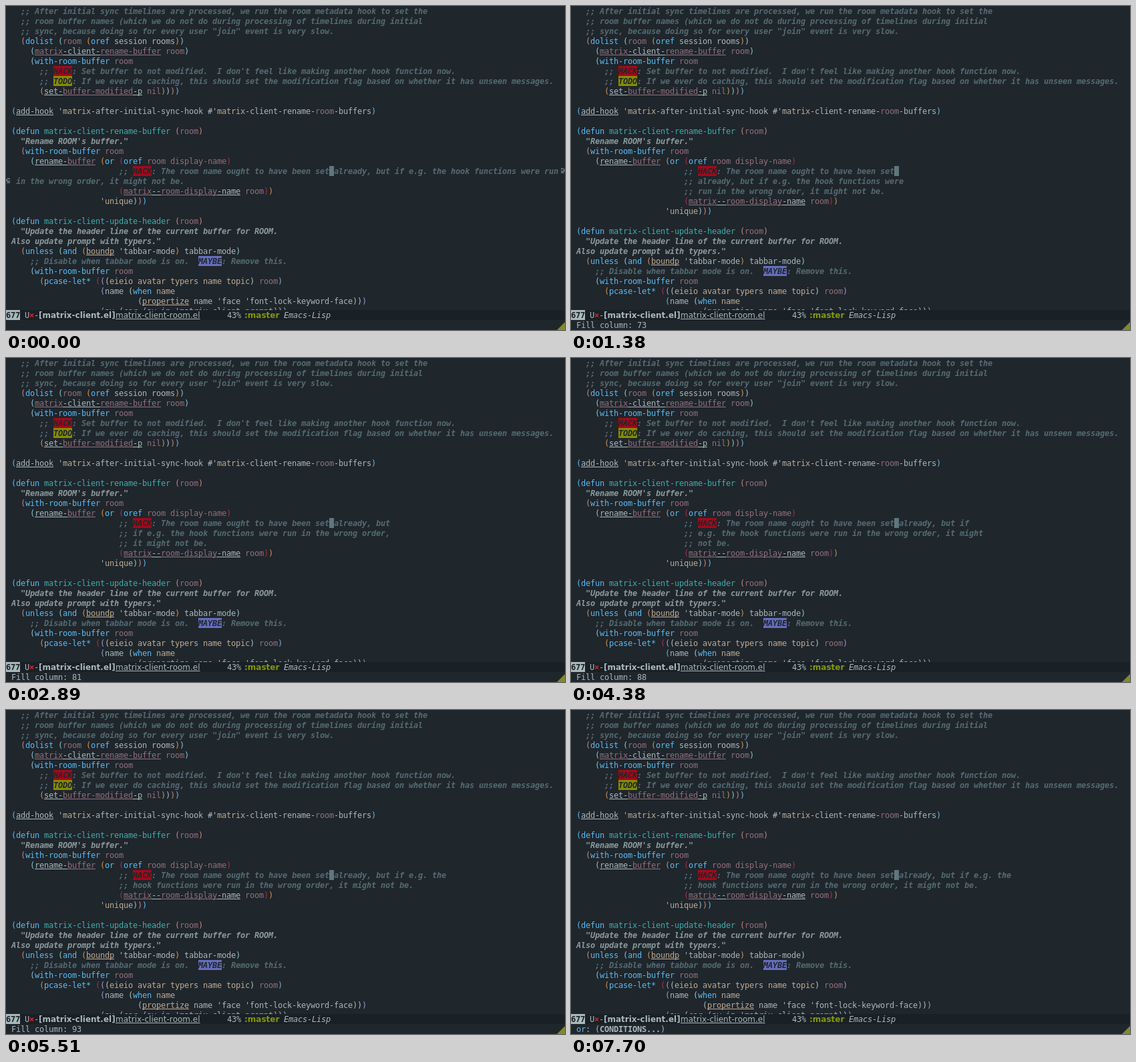
Write an HTML page that moves like this. It is 837 px wide and 486 px high and loops after 8000 ms.

```html
<!DOCTYPE html>
<html lang="en">
<head>
<meta charset="utf-8">
<title>Fill column</title>
<style>
html, body { margin: 0; width: 100%; height: 100%; overflow: hidden; background: #1f262c; }
#stage {
  position: relative; width: 837px; height: 486px; overflow: hidden;
  background: #1f262c; color: #a9b8bc;
  font: 12px/16px "DejaVu Sans Mono", monospace; white-space: pre;
  text-decoration-skip-ink: none; text-underline-offset: 1px; text-decoration-thickness: 1px;
  font-variant-ligatures: none; font-kerning: none;
}
#buffer { position: absolute; inset: 0 0 30px; overflow: hidden; }
.row { position: absolute; left: 8px; height: 15px; }
.row span { padding-top: 1px; }
.c, .d { font-weight: bold; font-style: italic; }
.c { color: #546a72; }
.d { color: #8b9a9e; }
.k { color: #5cbcf5; }
.f { color: #3fadac; }
.m { color: #93707c; }
.t { color: #c0ab92; }
.u, .v, .w { text-decoration-line: underline; }
.v { color: #93707c; }
.w { color: #c0ab92; }
.H, .T, .M { color: #1f262c; }
.H { background: #a3091a; }
.T { background: #858c05; }
.M { background: #666dbd; }
.C { background: #60767d; }
.b { font-weight: bold; }
.p1 { color: #5cbcf5; }
.p2 { color: #cc8878; }
.p3 { color: #8bc4d4; }
.p4 { color: #d6914e; }
.p5 { color: #ab3046; }
.p6 { color: #959fd2; }
.p7 { color: #b5c0c3; }
#mode { position: absolute; left: 0; top: 456px; width: 837px; height: 15px; background: #192026; }
#mode span { position: absolute; top: 0; height: 15px; }
#mode .sans { font-family: "DejaVu Sans", sans-serif; letter-spacing: 0; }
svg { position: absolute; left: 0; top: 0; }
</style>
</head>
<body>
<div id="stage">
  <div id="buffer"></div>
  <div id="mode"><span class="b" style="left:0;background:#a9b8bc;color:#192026">677</span><span style="left:28px">U</span><span class="b" style="left:35px;color:#d9252b">×</span><span style="left:42px">-</span><span class="sans b" style="left:49px">[matrix-client.el]</span><span class="sans u" style="left:164px">matrix-client-room.el</span><span style="left:331px">43%</span><span class="sans b" style="left:357px;color:#859900">:master</span><span style="left:416px;font-style:italic">Emacs-Lisp</span></div>
  <div class="row" id="echo" style="top:471px"></div>
  <svg width="837" height="486">
    <path d="M837 474V486H825Z" fill="#7e8a2b"/>
    <g id="wraps" fill="#566b74">
      <path id="hook" d="M2 0H6V2H2V3H3V4H5V3H6V8H1V7H2V6H1V5H0V2H1V1H2Z" transform="translate(0 258)"/>
      <path d="M2 0H6V2H2V3H3V4H5V3H6V8H1V7H2V6H1V5H0V2H1V1H2Z" transform="matrix(-1 0 0 1 837 243)"/>
    </g>
  </svg>
</div>
<script>
const LOOP = 8000, CELL = 7, ROW = 15, INDENT = 23;
const $ = id => document.getElementById(id);

// {x|text} wraps text in class x
const above = `  ;; After initial sync timelines are processed, we run the room metadata hook to set the
  ;; room buffer names (which we do not do during processing of timelines during initial
  ;; sync, because doing so for every user "join" event is very slow.
  ({k|dolist} ({m|room} ({k|oref} session rooms))
    ({v|matrix}{u|-client-}{v|rename-buffer} {m|room})
    ({k|with-room-buffer} {m|room}
      ;; {H|HACK}: Set buffer to not modified.  I don't feel like making another hook function now.
      ;; {T|TODO}: If we ever do caching, this should set the modification flag based on whether it has unseen messages.
      ({u|set-}{v|buffer-modified}{u|-p} {m|nil}))))

({u|add-hook} '{t|matrix}-after-initial-sync-hook #'{t|matrix}-client-rename-{m|room}-buffers)

({k|defun} {f|matrix-client-rename-buffer} ({m|room})
  "Rename ROOM's buffer."
  ({k|with-room-buffer} {m|room}
    ({u|rename-}{v|buffer} ({k|or} ({k|oref} {m|room display-name})`.split("\n");

const below = `                       ({v|matrix}{u|--}{v|room-display}{u|-name} {m|room}))
                   '{t|unique})))

({k|defun} {f|matrix-client-update-header} ({m|room})
  "Update the header line of the current buffer for ROOM.
Also update prompt with typers."
  ({k|unless} ({k|and} ({w|boundp} 'tabbar-mode) tabbar-mode)
    ;; Disable when tabbar mode is on.  {M|MAYBE}: Remove this.
    ({k|with-room-buffer} {m|room}
      ({k|pcase-let*} ((({t|eieio avatar typers name topic}) {m|room})
                   (name ({k|when} {t|name}
                           ({w|propertize} name 'face 'font-lock-keyword-face)))
                   (av ({k|car} (av in 'matrix-client-prompt)))`.split("\n");

const note = "HACK: The room name ought to have been set already, but if e.g. the hook functions were run in the wrong order, it might not be.";
const prefix = " ".repeat(INDENT) + ";;";
const decorate = line => line.replace("HACK", "{H|HACK}").replace(/been set ?/, "been set{C| }");

// Lines never break after "e.g.", as a single space does not end a sentence.
function fill(column) {
  const words = note.replace("e.g. ", "e.g.\u00a0").split(" ");
  const lines = [prefix];
  for (const word of words) {
    const last = lines.length - 1;
    if (lines[last].length + 1 + word.length <= column) lines[last] += " " + word;
    else lines.push(prefix + " " + word);
  }
  return lines.map(decorate);
}

function unfilled() {
  const line = prefix + " " + note, cut = line.indexOf(" in the wrong");
  return [decorate(line.slice(0, cut)), line.slice(cut)];
}

const markup = text => text.replace(/\{(\w)\|([^}]*)\}/g, '<span class="$1">$2</span>');

function renderBuffer(comment) {
  let depth = 1;
  const colourParen = p => {
    const level = p === "(" ? ++depth : depth--;
    return `<span class="p${level}">${p}</span>`;
  };
  const row = (text, i) => {
    const inNote = i >= above.length && i < above.length + comment.length;
    const face = inNote || /^\s*;;/.test(text) ? "c" : /^\s*"|"$/.test(text) ? "d" : "";
    if (text.startsWith("(")) depth = 0;
    const code = face ? text : text.replace(/[()]/g, colourParen);
    return `<div class="row ${face}" style="top:${i * ROW}px">${markup(code)}</div>`;
  };
  $("buffer").innerHTML = [...above, ...comment, ...below].map(row).join("");
}

// [first, last, count] of evenly spaced key presses, each widening the fill column by one
const presses = [
  [540, 790, 2], [1060, 2030, 6], [2240, 3100, 5], [3310, 4130, 5],
  [4380, 5260, 5], [5510, 5510, 1], [6640, 6640, 1]
].flatMap(([first, last, n]) =>
  Array.from({ length: n }, (_, i) => first + (last - first) * i / (n - 1 || 1)));

let shownColumn, shownEcho;
function draw() {
  const t = performance.now() % LOOP;
  const count = presses.filter(p => p <= t).length;
  const column = count && 69 + count;
  const echo = t >= 6970 ? "{k|or}: ({b|CONDITIONS...})" : count ? "Fill column: " + column : "";
  if (column !== shownColumn) {
    renderBuffer(column ? fill(column) : unfilled());
    $("wraps").style.display = column ? "none" : "";
    shownColumn = column;
  }
  if (echo !== shownEcho) $("echo").innerHTML = markup(shownEcho = echo);
  requestAnimationFrame(draw);
}

// Snap the monospace advance to whole cells.
$("echo").textContent = "0".repeat(100);
const advance = $("echo").getBoundingClientRect().width / 100;
$("stage").style.letterSpacing = CELL - advance + "px";
draw();
</script>
</body>
</html>
```
